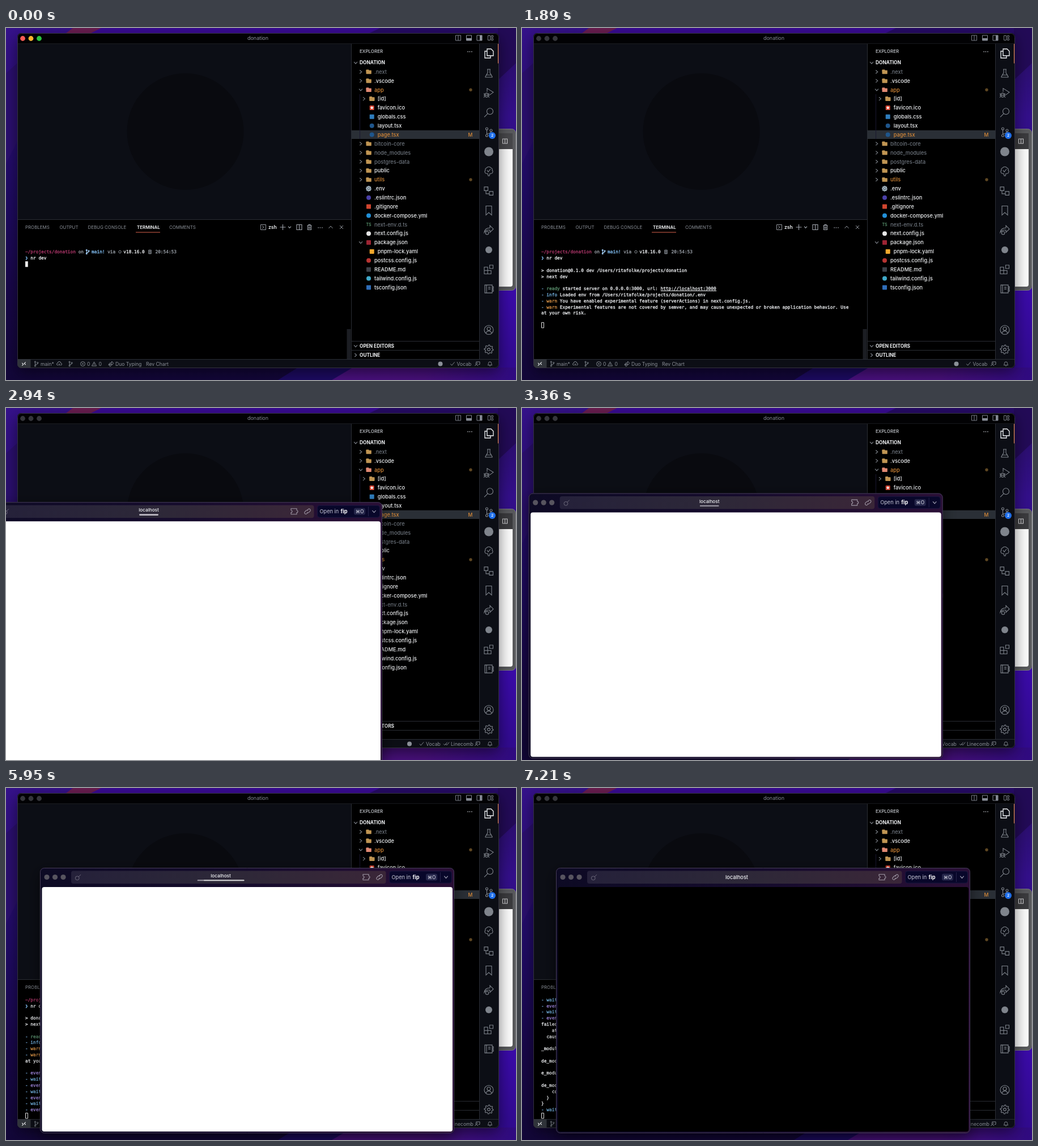
An HTML page with a canvas for the animation above (8000 ms loop, 900x622 px).

```html
<!DOCTYPE html>
<html lang="en">
<head>
<meta charset="utf-8">
<title>donation</title>
<style>
html, body { margin: 0; width: 100%; height: 100%; overflow: hidden; background: #120838; }
canvas { display: block; width: 100vw; height: 100vh; }
</style>
</head>
<body>
<canvas id="stage"></canvas>
<script>
const LOOP = 8000, W = 900, H = 622;
const canvas = document.getElementById('stage');
const c = canvas.getContext('2d');
const ratio = window.devicePixelRatio || 1;
canvas.width = W * ratio;
canvas.height = H * ratio;

const GREY = '#7f848c', WHITE = '#f2f4f6', ORANGE = '#d88a38', DIM = '#6d747d';
const EDGE = '#2a2d34', SURFACE = '#0c0e15';

// Times at which things change, in ms
const BLUR = 560, UNDERLINE = 1330, OPEN = 2100, LOADING = 2240, PAINT = 2520, FORMATTER = 2450;
const MOVE = [2975, 3640], GROW = [5530, 6090], BLACKOUT = 6160, SETTLE = [6790, 7000];

const clamp = v => Math.max(0, Math.min(1, v));
const smooth = (t, [from, to]) => { const p = clamp((t - from) / (to - from)); return p * p * (3 - 2 * p); };
const mix = (a, b, p) => a + (b - a) * p;

// ---------- drawing helpers ----------
function box(x, y, w, h, fill, radius = 0, stroke) {
  c.beginPath();
  c.roundRect(x, y, w, h, radius);
  if (fill) { c.fillStyle = fill; c.fill(); }
  if (stroke) { c.strokeStyle = stroke; c.lineWidth = 1; c.stroke(); }
}
function shadowBox(x, y, w, h, fill, radius) {
  c.save();
  c.shadowColor = 'rgba(0,0,0,.5)';
  c.shadowBlur = 26 * ratio;
  c.shadowOffsetY = 8 * ratio;
  box(x, y, w, h, fill, radius);
  c.restore();
}
function dot(x, y, r, fill) {
  c.beginPath();
  c.arc(x, y, r, 0, 7);
  c.fillStyle = fill;
  c.fill();
}
function poly(fill, ...p) {
  c.beginPath();
  for (let i = 0; i < p.length; i += 2) c.lineTo(p[i], p[i + 1]);
  c.fillStyle = fill;
  c.fill();
}
function gradient(x0, y0, x1, y1, ...colors) {
  const g = c.createLinearGradient(x0, y0, x1, y1);
  colors.forEach((color, i) => g.addColorStop(i / (colors.length - 1), color));
  return g;
}
// y is the middle of the capitals
function text(s, x, y, color = WHITE, size = 9.2, weight = 400, align = 'left') {
  c.font = `${weight} ${size}px Inter, sans-serif`;
  c.textAlign = align;
  c.fillStyle = color;
  c.fillText(s, x, y + size * 0.36);
}
function icon(name, x, y, color = GREY, scale = 1, width = 1.1) {
  c.save();
  c.translate(x, y);
  c.scale(scale, scale);
  c.strokeStyle = color;
  c.lineWidth = width / scale;
  c.stroke(new Path2D(ICONS[name]));
  c.restore();
}
const ring = (x, y, r) => `M${x + r} ${y}a${r} ${r} 0 1 0 ${-2 * r} 0a${r} ${r} 0 1 0 ${2 * r} 0`;
const square = (x, y, w, h = w) => `M${x} ${y}h${w}v${h}h${-w}z`;
function cog() {
  let d = ring(0, 0, 2.4);
  for (let i = 0; i <= 32; i++) {
    const a = i * Math.PI / 16, r = i % 4 < 2 ? 8 : 6;
    d += `${i ? 'L' : 'M'}${r * Math.cos(a)} ${r * Math.sin(a)}`;
  }
  return d;
}

const ICONS = {
  files: 'M-3 -8H4L8 -4V4H-3ZM-3 -4H-7V8H3V4',
  flask: 'M-3 -7H3M-2 -7V-1L-6 6V7H6V6L2 -1V-7M-4 3H4',
  debug: 'M-3 -2V-8L8 -1L1 4M-7 4a3 3.5 0 1 0 6 0a3 3.5 0 1 0 -6 0M-9 1l2 1M-9 4H1M-9 8l2 -2M1 1l-2 1M1 8l-2 -2',
  search: ring(2, -2, 5.5) + 'M-2 2L-8 8',
  branch: ring(-3.5, -6, 2) + ring(4, -3, 2) + ring(-3.5, 6, 2) + 'M-3.5 -4V4M4 -1Q4 2 -3.5 3',
  tree: 'M-2 4H-4A3.5 3.5 0 0 1 -6 -2A3 3 0 0 1 -4 -6A5 5 0 0 1 4 -6A3 3 0 0 1 6 -2A3.5 3.5 0 0 1 4 4H2L1 8H-1ZM-3 -2L-1 1L3 -4',
  linked: square(-8, -7, 6.5) + square(1, 1, 6.5) + 'M-5 0V5H1',
  bookmark: 'M-5 -8H5V8L0 3.5L-5 8Z',
  share: ring(-3, 5, 2.7) + 'M2 -8L8 -2L2 4V0Q-5 -1 -8 4Q-7 -4 2 -4Z',
  blocks: square(-8, -4, 6) + square(-8, 2, 6) + square(-2, 2, 6) + square(1.5, -7.5, 6),
  notebook: square(-7, -7, 13, 14) + 'M-4 -7V7M-1 -3H3M-1 0H3M6 -4H8V-1H6M6 1H8V4H6',
  account: ring(0, 0, 8) + ring(0, -2, 3) + 'M-5 6Q-4 2 0 2Q4 2 5 6',
  cog: cog(),
  down: 'M-3.5 -2L0 2L3.5 -2', up: 'M-3.5 2L0 -2L3.5 2', right: 'M-2 -3.5L2 0L-2 3.5',
  close: 'M-3 -3L3 3M3 -3L-3 3', plus: 'M-5 0H5M0 -5V5',
  split: square(-4.5, -4.5, 9) + 'M0 -4.5V4.5',
  shell: square(-4.5, -4.5, 9) + 'M-2 -2.5L1 0L-2 2.5',
  trash: 'M-4 -3H4M-1.5 -3V-4.5H1.5V-3M-3 -3V4.5H3V-3M-1 -1V3M1 -1V3',
  grid: square(-4.5, -4, 4, 8) + square(1.5, -4, 3) + square(1.5, 1, 3),
  remote: 'M-4 -2L-1 1L-4 4M4 -4L1 -1L4 2',
  cloud: 'M-2 2.5H-3A2 2 0 0 1 -3 -1.5A3 3 0 0 1 3 -1.5A2 2 0 0 1 3 2.5H2M0 3.5V0M-1.5 1.5L0 0L1.5 1.5',
  cross: ring(0, 0, 4) + 'M-1.7 -1.7L1.7 1.7M1.7 -1.7L-1.7 1.7',
  warning: 'M0 -4L4.5 4H-4.5ZM0 -1V1.5M0 2.2V3',
  check: 'M-4 0L-1.5 3L4 -3.5',
  feedback: ring(-2, -1, 1.5) + 'M-5 4Q-4 1 -2 1.5Q0 1 1 4M-3 -4H4.5V1H2',
  bell: 'M-4 2.5Q-3 1 -3 -1A3 3 0 0 1 3 -1Q3 1 4 2.5ZM-1 4H1',
  puzzle: 'M-6 -5H4V-2A2 2 0 1 1 4 2V5H-6V2A2 2 0 1 0 -6 -2Z',
  link: 'M-1 -2L2 -4.5A2.5 2.5 0 0 1 5 -1L2 2A2.5 2.5 0 0 1 -1 1.5M1 2L-2 4.5A2.5 2.5 0 0 1 -5 1L-2 -2A2.5 2.5 0 0 1 1 -1.5',
  can: 'M-2.5 -3H2.5M-2 -3V3H2V-3M-2 0H2'
};

// ---------- explorer ----------
// name, depth, text colour, icon kind, icon colour, chevron
const TAN = '#c09553';
const FILES = [
  ['.next', 0, DIM, 'folder', TAN, 'right'],
  ['.vscode', 0, WHITE, 'folder', TAN, 'right'],
  ['app', 0, ORANGE, 'folder', '#e08872', 'down'],
  ['[id]', 1, WHITE, 'folder', TAN, 'right'],
  ['favicon.ico', 1, WHITE, 'star', '#d8432f'],
  ['globals.css', 1, WHITE, 'square', '#2f7dbd'],
  ['layout.tsx', 1, WHITE, 'circle', '#1f568c'],
  ['page.tsx', 1, ORANGE, 'circle', '#1f568c'],
  ['bitcoin-core', 0, DIM, 'folder', TAN, 'right'],
  ['node_modules', 0, DIM, 'folder', TAN, 'right'],
  ['postgres-data', 0, DIM, 'folder', TAN, 'right'],
  ['public', 0, WHITE, 'folder', TAN, 'right'],
  ['utils', 0, ORANGE, 'folder', TAN, 'right'],
  ['.env', 0, WHITE, 'cog', '#a9bcc9'],
  ['.eslintrc.json', 0, WHITE, 'circle', '#4a40a8'],
  ['.gitignore', 0, WHITE, 'square', '#d0452f'],
  ['docker-compose.yml', 0, WHITE, 'circle', '#2290d8'],
  ['next-env.d.ts', 0, DIM, 'letters', '#5c9a72'],
  ['next.config.js', 0, WHITE, 'circle', '#e6e6e6'],
  ['package.json', 0, WHITE, 'square', '#9c2433', 'down'],
  ['pnpm-lock.yaml', 1, WHITE, 'square', '#f0a72c'],
  ['postcss.config.js', 0, WHITE, 'circle', '#b83432'],
  ['README.md', 0, WHITE, 'square', '#3b4048'],
  ['tailwind.config.js', 0, WHITE, 'circle', '#3fa9c9'],
  ['tsconfig.json', 0, WHITE, 'square', '#2f6db8']
];

function fileIcon(kind, x, y, color) {
  if (kind === 'folder') {
    box(x - 4.5, y - 4, 5, 4, color, 0.8);
    box(x - 4.5, y - 2.8, 9.3, 6.6, color, 0.8);
  } else if (kind === 'cog') icon('cog', x, y, color, 0.52, 1.6);
  else if (kind === 'circle') dot(x, y, 4, color);
  else if (kind === 'letters') text('TS', x, y, color, 7, 600, 'center');
  else box(x - 4, y - 4, 8, 8, color, 0.8);
  if (kind === 'star') {
    const points = [];
    for (let i = 0; i < 10; i++) {
      const a = i * Math.PI / 5, r = i % 2 ? 1.4 : 3.4;
      points.push(x + r * Math.sin(a), y - r * Math.cos(a));
    }
    poly('#fff', ...points);
  }
}

function explorer() {
  box(609, 28, 226.5, 557, '#000');
  box(609, 28, 1, 557, EDGE);
  text('EXPLORER', 624, 41, '#c6cad0', 8, 500);
  text('···', 818.5, 41, '#c6cad0', 10, 700, 'center');
  icon('down', 617, 61.5, GREY, 0.85);
  text('DONATION', 624, 61.5, WHITE, 8.3, 700);
  box(610, 180.7, 225, 15.4, '#2a2f36');
  box(624, 117, 1, 79, '#191730');
  FILES.forEach(([name, depth, color, kind, tint, chevron], i) => {
    const y = 77.5 + i * 15.87, x = 640 + depth * 5.7;
    if (chevron) icon(chevron, x - 14, y, GREY, 0.85);
    fileIcon(kind, x, y, tint);
    text(name, x + 10, y, color, 9.2, 500);
  });
  text('M', 819.5, 188.6, ORANGE, 8.6, 500, 'center');
  dot(820, 109.3, 2.7, '#5f4722');
  dot(820, 268, 2.7, '#5f4722');
  box(609, 553, 226, 1, EDGE);
  box(609, 569, 226, 1, EDGE);
  icon('down', 617, 562, GREY, 0.85);
  text('OPEN EDITORS', 624, 562, WHITE, 8.3, 700);
  icon('right', 617, 578, GREY, 0.85);
  text('OUTLINE', 624, 578, WHITE, 8.3, 700);
}

function activityBar() {
  box(835, 28, 35, 557, SURFACE);
  box(835, 28, 1, 557, EDGE);
  box(868, 28, 1.6, 34.5, '#f0805a');
  icon('files', 852, 45, WHITE, 1, 1.3);
  const names = ['flask', 'debug', 'search', 'branch', null, 'tree', 'linked', 'bookmark', 'share', null, 'blocks', 'notebook'];
  names.forEach((name, i) => name && icon(name, 852, 80 + i * 34.65));
  dot(858, 190, 6, '#1f6feb');
  text('2', 858, 190, '#fff', 6.8, 600, 'center');
  dot(852, 218.5, 8, GREY);
  dot(852, 392, 6, GREY);
  icon('account', 852, 533.5);
  icon('cog', 852, 568);
}

// ---------- terminal ----------
const INK = { w: '#f0f2f5', m: '#b2386c', b: '#86c5fb', d: '#9ba1a9', g: '#5d9470', c: '#74b4e2', o: '#dd9648', p: '#a48ae4' };
const EVENT = '^b- ^pevent^w compiled client and server successfully in 190 ms (20 modules)';
const WAIT = '^b- ^cwait^w compiling...';
const LINES = [
  [0, ''], [0, ''],
  [0, '^m~/projects/donation^d on   ^bmain!^d via   ^wv18.16.0    ^d20:54:53'],
  [0, '^b❯^w nr dev'],
  [210, ''],
  [210, '> donation@0.1.0 dev /Users/ritafolke/projects/donation'],
  [210, '> next dev'],
  [210, ''],
  [420, '^b- ^gready^w started server on 0.0.0.0:3000, url: http://localhost:3000'],
  [490, '^b- ^cinfo^w Loaded env from /Users/ritafolke/projects/donation/.env'],
  [560, '^b- ^owarn^w You have enabled experimental feature (serverActions) in next.config.js.'],
  [630, '^b- ^owarn^w Experimental features are not covered by semver, and may cause unexpected or broken application behavior. Use'],
  [630, 'at your own risk.'],
  [630, ''],
  [2300, EVENT], [2400, WAIT], [2900, EVENT], [4060, WAIT], [4480, EVENT], [4620, WAIT], [4830, EVENT],
  ...['failed to get data', '    at fetch', '  cause: Error', '', '_modules/', '', 'de_modules/', '', 'e_modules/', '',
    'de_modules/', '    code: 1', '  }', '}'].map(s => [7140, s]),
  [7210, WAIT]
];
const CELL = 4.684, ROW = 10.8, ROWS = 20;

function terminal(t) {
  const shown = LINES.filter(([time]) => time <= t);
  const first = Math.max(0, shown.length + 1 - ROWS);
  const rowY = i => 374 + (i - first) * ROW;
  c.textAlign = 'left';
  for (let i = first; i < shown.length; i++) {
    let x = 34, y = rowY(i);
    c.font = '7.78px "DejaVu Sans Mono", monospace';
    c.lineWidth = 0.3;
    c.fillStyle = c.strokeStyle = INK.w;
    for (const part of shown[i][1].split(/(\^\w)/)) {
      if (part[0] === '^') { c.fillStyle = c.strokeStyle = INK[part[1]]; continue; }
      c.fillText(part, x, y + 2.8);
      c.strokeText(part, x, y + 2.8); // a touch heavier than regular
      x += part.length * CELL;
    }
    if (i === 2) {
      icon('branch', 144, y, '#a9d5ff', 0.5, 1.1);
      c.strokeStyle = INK.d;
      c.lineWidth = 0.9;
      c.stroke(new Path2D(ring(201, y, 2.2)));
      icon('can', 254, y, INK.d);
    }
    if (i === 8 && t >= UNDERLINE) box(34 + 45 * CELL, y + 3.6, 21 * CELL, 0.9, INK.w);
  }
  const y = rowY(shown.length);
  if (t < BLUR) box(34, y - 5, 4.8, 10, '#eee');
  else box(34.5, y - 4.8, 4, 9.4, null, 0, '#ddd');
}

function panel(t) {
  box(20, 338, 589, 247, '#000');
  box(20, 338, 589, 1, EDGE);
  [['PROBLEMS', 34], ['OUTPUT', 94.5], ['DEBUG CONSOLE', 144.5], ['COMMENTS', 288]]
    .forEach(([name, x]) => text(name, x, 352, '#8b9098', 7.9));
  text('TERMINAL', 231, 352, WHITE, 7.9, 600);
  box(229, 360.5, 43, 1, '#d9634c');
  const tone = '#a3a8af';
  icon('shell', 454, 352, tone, 1, 0.9);
  text('zsh', 463, 352, WHITE, 8.6, 600);
  icon('plus', 488.5, 352, tone);
  icon('down', 500.5, 352, tone, 0.7);
  icon('split', 517.5, 352, tone);
  icon('trash', 535.5, 352, tone);
  text('···', 554.5, 352, tone, 10, 700, 'center');
  icon('up', 573, 352, tone, 1, 0.9);
  icon('close', 592, 352, tone, 1, 0.9);
  terminal(t);
  box(601.5, 532, 7, 53, '#1c1e23');
}

function statusBar(t) {
  const tone = '#8b9098', y = 593.5;
  const label = (s, x) => text(s, x, y, tone, 8.6);
  const glyph = (name, x, scale = 0.9) => icon(name, x, y, tone, scale, 0.9);
  box(20, 585, 850, 16, SURFACE);
  box(20, 585, 850, 1, EDGE);
  box(20, 585, 23.5, 16, '#30343a');
  icon('remote', 31.5, y, WHITE, 0.8);
  glyph('branch', 53.5, 0.58);
  label('main*', 61);
  glyph('cloud', 94);
  glyph('branch', 114, 0.55);
  glyph('cross', 135.5, 1);
  label('0', 143);
  glyph('warning', 155.5);
  label('0', 163.5);
  glyph('share', 185.5, 0.55);
  label('Duo Typing', 193);
  label('Rev Chart', 247);
  const shift = t >= FORMATTER ? -54.5 : 0;
  dot(766.5 + shift, y, 4, tone);
  glyph('check', 788 + shift);
  label('Vocab', 795.5 + shift);
  if (shift) {
    glyph('check', 775.5, 0.8);
    glyph('check', 779, 0.8);
    label('Linecomb', 785);
  }
  glyph('feedback', 832);
  glyph('bell', 854);
}

function editor(t) {
  shadowBox(20, 9, 850, 592, '#000', 7);
  c.save();
  c.beginPath();
  c.roundRect(20, 9, 850, 592, 7);
  c.clip();
  box(20, 9, 850, 19, '#020204');
  box(20, 27.5, 850, 1, EDGE);
  const focused = t < BLUR;
  const lights = focused ? ['#fb5c55', '#fcb52f', '#2bc440'] : Array(3).fill('#35363b');
  lights.forEach((color, i) => dot(29.5 + i * 14.5, 18.5, 4.4, color));
  const tone = focused ? '#9095a0' : '#858a94';
  text('donation', 444.5, 18, tone, 9, 400, 'center');
  [798, 817, 835.5].forEach((x, i) => {
    if (i) box(x - 4.5, 13, 9, 9, null, 0, tone);
    else icon('split', x, 17.5, tone, 1, 0.9);
  });
  box(813, 18, 8.5, 4, tone);
  box(836, 13, 4, 9, tone);
  icon('grid', 855, 17.5, tone, 1, 0.9);
  box(20, 28.5, 589, 310, SURFACE);
  dot(316.5, 183, 103, '#090a0f');
  explorer();
  activityBar();
  panel(t);
  statusBar(t);
  c.restore();
  box(20.5, 9.5, 849, 591, null, 7, '#34323f');
}

// ---------- desktop ----------
function wallpaper() {
  box(0, 0, W, H, gradient(0, 0, 0, H, '#35118a', '#280d74', '#1e0a60', '#180748', '#120638'));
  poly('#2a0f6e', 0, 80, 20, 62, 20, 200, 0, 240);
  poly('#390b94', 160, 0, 660, 0, 640, 9, 150, 9);
  poly('#6a1d50', 118, 0, 168, 0, 150, 9, 106, 9);
  poly('#260b66', 660, 0, 900, 0, 900, 10, 640, 10);
  box(868, 0, 32, H, gradient(0, 0, 0, H, '#260d5e', '#330f8a', '#2f0c88', '#3a0aa8', '#2f0a8a'));
  poly('#220a56', 868, 0, 900, 0, 900, 62, 868, 92);
  poly('#1c0a62', 480, 622, 515, 600, 625, 600, 580, 622);
  poly(gradient(575, 0, 900, 0, '#4a1080', '#48107c', '#2f0a80'), 575, 622, 612, 600, 900, 600, 900, 622);
}

function backWindow(t) {
  box(840, 178.5, 59.5, 285, '#58595c', 7, '#7b7b80');
  box(868, 186, 26, 28, t < 1890 ? '#47474a' : '#3b3b3e');
  box(868, 214, 26, 243, '#fdfdfd', [0, 0, 4, 0]);
  icon('split', 880.5, 200, '#d5d5d8', 0.9);
}

// ---------- browser ----------
function loadingBar(t, settle) {
  const grow = smooth(t, GROW), width = mix(34, 92, grow), left = 379 - width / 2;
  const pulse = 0.68 + 0.32 * Math.cos(2 * Math.PI * (t - 5390) / 3000);
  c.save();
  c.globalAlpha *= 1 - settle;
  c.beginPath();
  c.roundRect(left, 162, width, 2.6, 1.3);
  c.clip();
  box(left, 162, width, 2.6, `rgba(235,232,240,${mix(pulse, 0.5, grow)})`);
  if (grow > 0) {
    const start = left + 14 * grow + Math.max(0, t - 6100) * 0.11;
    box(start, 162, width, 2.6, `rgba(225,228,225,${0.75 * grow})`);
  }
  c.restore();
}

function browser(t) {
  if (t < OPEN) return;
  const move = smooth(t, MOVE), enter = clamp((t - OPEN + 30) / 100), zoom = mix(0.93, 1, enter);
  c.save();
  c.globalAlpha = enter;
  c.translate(mix(-127, 0, move), mix(25.3, 0, move));
  c.translate(425, 375);
  c.scale(zoom, zoom);
  c.translate(-425, -375);

  shadowBox(60, 141, 731, 469, '#0d0920', 7);
  box(60.5, 141.5, 730, 468, gradient(60, 0, 791, 0, '#0d0a24', '#150b2c', '#2a0f36'), 7, '#463c58');
  const white = t >= PAINT && t < BLACKOUT;
  box(63.5, 175, 724.5, 432, white ? '#fff' : '#000', 4);

  for (let i = 0; i < 3; i++) dot(72 + i * 14.5, 157.5, 4.6, '#57545f');
  box(115, 146.5, 555.5, 22.5, gradient(115, 0, 670, 0, '#25213a', '#2d2838', '#3a2638'), 4);
  icon('search', 127, 158, '#9692a2', -0.62);
  icon('puzzle', 636, 157.5, '#9c94a2');
  icon('link', 659, 157.5, '#9c94a2');

  const loading = t >= LOADING, settle = loading ? smooth(t, SETTLE) : 1;
  text('localhost', 379, mix(155, 158, settle), WHITE, mix(8.2, 9.2, settle), 500, 'center');
  if (settle < 1) loadingBar(t, settle);

  box(676.5, 147, 110, 21, '#08072a', 4, '#19153f');
  text('Open in', 680.5, 157.5, '#c9cad8', 9.2);
  text('fip', 717.5, 157.5, '#fff', 9.2, 700);
  box(741, 151.5, 20, 12, '#25264a', 3);
  text('⌘O', 751, 157.5, '#c9cad8', 8.4, 500, 'center');
  box(766, 149, 1, 17, '#25234a');
  icon('down', 776.5, 157.5, '#a5a5b8', 0.9);
  c.restore();
}

function render() {
  const t = performance.now() % LOOP;
  c.setTransform(ratio, 0, 0, ratio, 0, 0);
  wallpaper();
  backWindow(t);
  editor(t);
  browser(t);
  requestAnimationFrame(render);
}
render();
</script>
</body>
</html>
```
